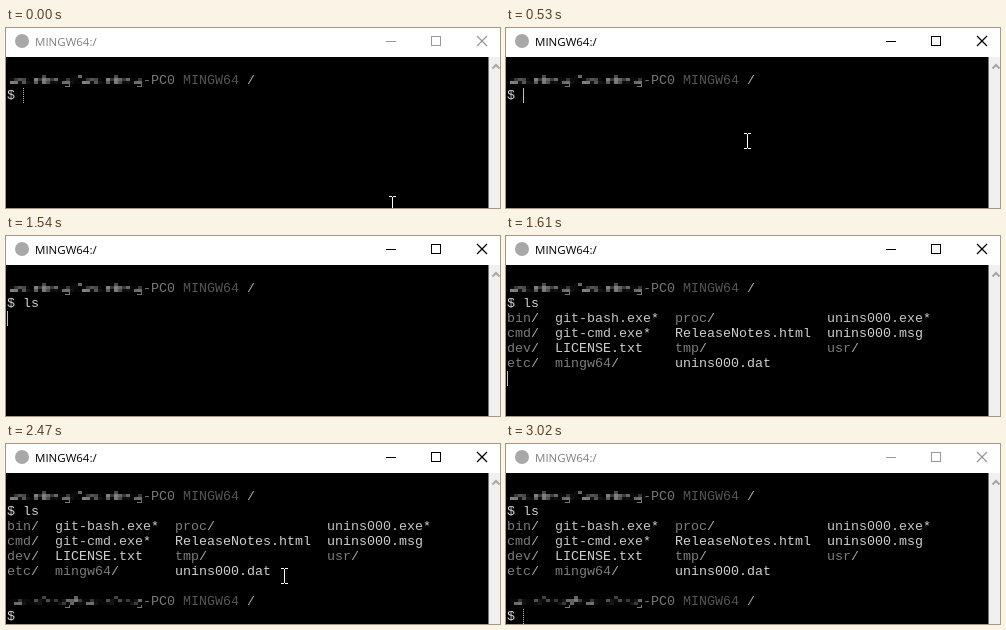
An HTML page with a canvas that plays this animation: 494 px wide and 180 px high, repeating every 3100 ms.

```html
<!DOCTYPE html>
<html lang="en">
<head>
<meta charset="utf-8">
<title>Terminal</title>
<style>
  html, body { margin: 0; width: 100%; height: 100%; overflow: hidden; background: #000; }
  canvas { display: block; width: 494px; height: 180px; }
</style>
</head>
<body>
<canvas id="stage" width="494" height="180"></canvas>
<script>
const ctx = document.getElementById('stage').getContext('2d');
const LOOP = 3100;
const STEPS = [0, 70, 150, 220, 300, 370, 450, 530, 910, 1310, 1460, 1540, 1610,
  1690, 2240, 2470, 2550, 2620, 2700, 2790, 3020];
const MONO = '13.33px "Liberation Mono", monospace';
const COLOR = { text: '#d0d0d0', user: '#787878', system: '#555', path: '#a9a9a9',
  dir: '#7c7c7c', exe: '#c6c6c6' };

const LISTING = [
  ['bin/', 'git-bash.exe*', 'proc/', 'unins000.exe*'],
  ['cmd/', 'git-cmd.exe*', 'ReleaseNotes.html', 'unins000.msg'],
  ['dev/', 'LICENSE.txt', 'tmp/', 'usr/'],
  ['etc/', 'mingw64/', 'unins000.dat']
];
const LIST_COLUMNS = [0, 6, 21, 40];

const cellX = col => 1 + col * 8;
const rowY = row => 45 + row * 15;

function rect(x, y, w, h, color) {
  ctx.fillStyle = color;
  ctx.fillRect(x, y, w, h);
}

function write(text, col, row, color) {
  ctx.font = MONO;
  ctx.fillStyle = color;
  ctx.fillText(text, cellX(col), rowY(row) + 11);
}

function line(points, color, width) {
  ctx.strokeStyle = color;
  ctx.lineWidth = width;
  ctx.beginPath();
  points.forEach(([x, y]) => ctx.lineTo(x, y));
  ctx.stroke();
}

function noise(n) {
  const v = Math.sin(n * 12.9898) * 43758.5453;
  return v - Math.floor(v);
}

// Pixelated stand-in for the hidden user and host name, the same word twice.
function drawMosaic(row, seed) {
  const top = rowY(row);
  for (let i = 0; i < 33; i++) {
    const part = i % 18;
    const tall = part === 8 || part > 15;
    for (let j = tall ? 0 : 1; j < 3; j++) {
      const n = noise(seed + part * 3 + j);
      const shade = Math.round(n < 0.4 ? n * 60 : n * 130);
      rect(4 + i * 4, top + 2 + j * 3, 4, 3, `rgb(${shade},${shade},${shade})`);
    }
  }
  for (const x of [59, 131]) {
    rect(x, top + 13, 5, 1, COLOR.user);
    rect(x + 4, top + 11, 1, 2, COLOR.user);
  }
}

function drawPrompt(row, seed) {
  drawMosaic(row, seed);
  write('-PC0', 17, row, COLOR.user);
  write('MINGW64', 22, row, COLOR.system);
  write('/', 30, row, COLOR.path);
  write('$', 0, row + 1, COLOR.text);
}

function drawEntry(name, col, row) {
  const mark = name.slice(-1);
  if (mark !== '/' && mark !== '*') return write(name, col, row, COLOR.text);
  write(name.slice(0, -1), col, row, mark === '/' ? COLOR.dir : COLOR.exe);
  write(mark, col + name.length - 1, row, mark === '/' ? COLOR.path : COLOR.text);
}

function drawCaret(col, row, active) {
  const x = cellX(col) + (col ? 0 : -0);
  const y = rowY(row);
  if (active) return rect(x, y, 1, 15, '#bfbfbf');
  for (let dy = 0; dy < 15; dy += 2) rect(x, y + dy, 1, 1, '#bfbfbf');
}

function drawPointer([x, y]) {
  for (const edge of [y - 8, y + 7]) {
    rect(x - 3, edge, 3, 1, '#fff');
    rect(x + 1, edge, 3, 1, '#fff');
  }
  rect(x, y - 7, 1, 14, '#fff');
}

function pointerAt(t) {
  if (t < 1310) {
    const u = Math.min(t / 300, 1);
    const ease = 1 - (1 - u) ** 2;
    const drift = t >= 370 ? 1 : 0;
    return [Math.round(386 - 146 * ease) + drift, Math.round(176 - 63 * ease)];
  }
  if (t >= 2470 && t < 2790) {
    const u = (t - 2470) / 230;
    return [Math.round(278 + 157 * u), Math.round(132 + 42 * u)];
  }
  return null;
}

function caretAt(t) {
  if (t < 910) return [2, 1];
  if (t < 1310) return null;
  if (t < 1460) return [3, 1];
  if (t < 1540) return [4, 1];
  if (t < 1610) return [0, 2];
  if (t < 1690) return [0, 6];
  if (t < 2240 || t >= 2790) return [2, 8];
  return null;
}

function drawWindow(active) {
  const ink = active ? '#000' : '#999';
  rect(0, 0, 494, 29, '#fff');
  rect(482.5, 29, 12, 151, '#f0f0f0');
  ctx.fillStyle = '#a8a8a8';
  ctx.beginPath();
  ctx.arc(16, 13, 7, 0, Math.PI * 2);
  ctx.fill();

  ctx.font = '11.5px "Open Sans", sans-serif';
  ctx.fillStyle = active ? '#000' : '#808080';
  ctx.fillText('MINGW64:/', 29, 18);

  rect(380, 13, 10, 1, ink);
  ctx.strokeStyle = ink;
  ctx.lineWidth = 1;
  ctx.strokeRect(425.5, 8.5, 9, 9);
  line([[471, 8], [481, 18]], ink, 1.2);
  line([[481, 8], [471, 18]], ink, 1.2);
  line([[486.5, 40.5], [490, 37], [493.5, 40.5]], '#a6a6a6', 2);
}

function draw(t) {
  const active = t >= 530 && t < 3020;
  rect(0, 0, 494, 180, '#000');
  drawPrompt(0, 11);
  if (t >= 1310) write(t < 1460 ? 'l' : 'ls', 2, 1, COLOR.text);
  if (t >= 1610) {
    LISTING.forEach((names, i) =>
      names.forEach((name, j) => drawEntry(name, LIST_COLUMNS[j], 2 + i)));
  }
  if (t >= 1690) drawPrompt(7, 47);

  const caret = caretAt(t);
  if (caret) drawCaret(...caret, active);
  drawWindow(active);
  const pointer = pointerAt(t);
  if (pointer) drawPointer(pointer);
}

const start = performance.now();
function tick() {
  const t = (performance.now() - start) % LOOP;
  draw(STEPS.filter(step => step <= t).pop());
  requestAnimationFrame(tick);
}
tick();
</script>
</body>
</html>
```
